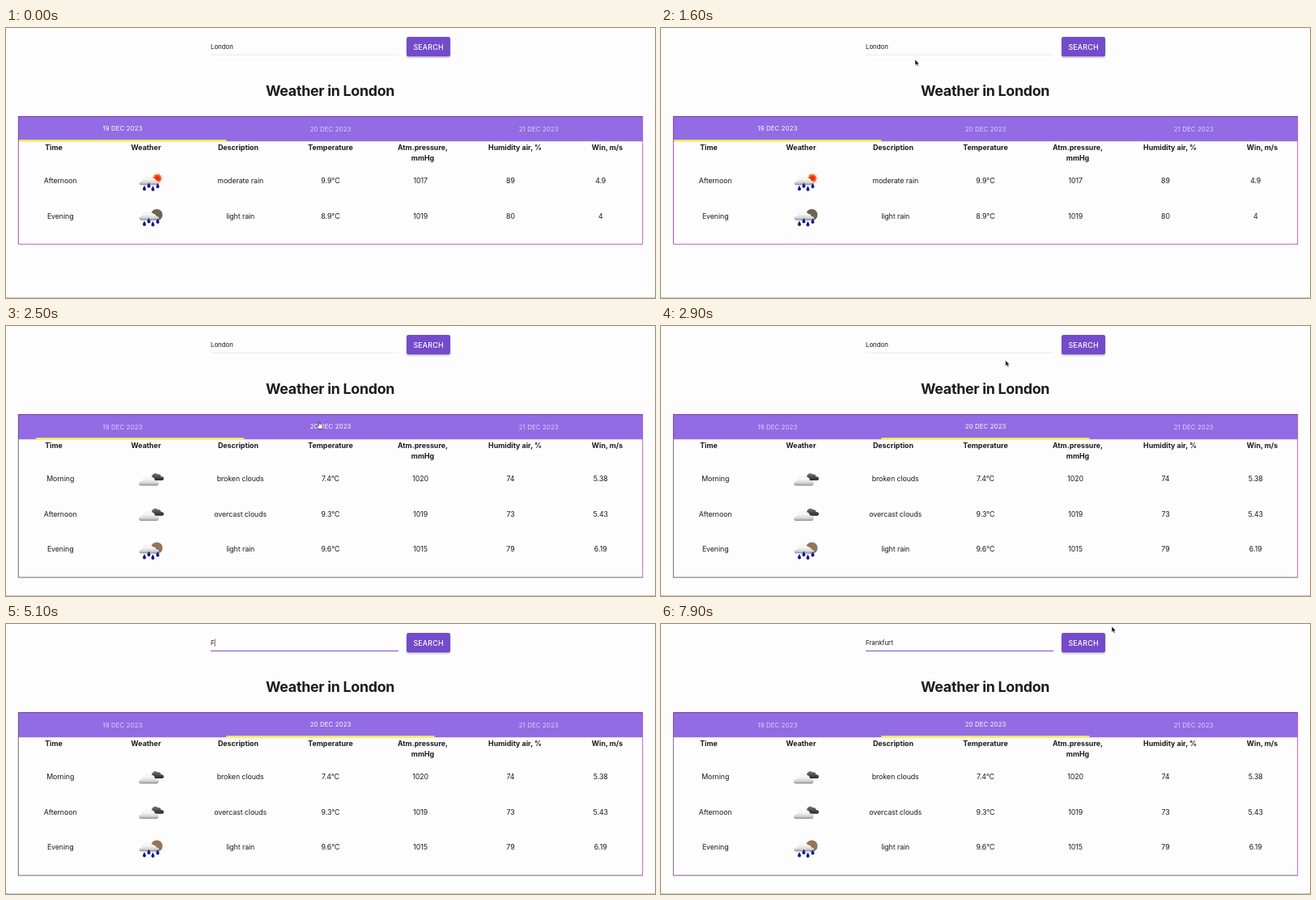
An HTML page for the animation above (8000 ms loop, 802 by 334 pixels).

```html
<!DOCTYPE html>
<html lang="en">
<head>
<meta charset="utf-8">
<title>Weather</title>
<style>
  html, body { margin: 0; width: 100%; height: 100%; overflow: hidden; background: #fdfdfd; }
  svg { display: block; width: 100%; height: 100%; }
  text { font: 400 8.8px Inter, Roboto, sans-serif; letter-spacing: -.07px; fill: #1b1b20; }
  .mid { text-anchor: middle; }
  .head { font-size: 8.9px; font-weight: 700; letter-spacing: 0; }
  .title { font-size: 17.8px; font-weight: 700; letter-spacing: -.27px; }
  .tab { font-size: 7.8px; letter-spacing: .14px; fill: #fff; }
  .btn { font-size: 8.8px; font-weight: 500; letter-spacing: .25px; fill: #fff; }
  .input { font-size: 7.8px; letter-spacing: 0; }
</style>
</head>
<body>
<svg id="stage" viewBox="0 0 802 334">
  <defs>
    <linearGradient id="pale" x2="0" y2="1">
      <stop offset=".35" stop-color="#f6f6f6"/><stop offset=".75" stop-color="#d2d2d2"/><stop offset="1" stop-color="#8c8c8c"/>
    </linearGradient>
    <linearGradient id="dark" x2="0" y2="1">
      <stop offset="0" stop-color="#777"/><stop offset=".6" stop-color="#454545"/><stop offset="1" stop-color="#2c2c2c"/>
    </linearGradient>
    <radialGradient id="sunFill">
      <stop offset=".3" stop-color="#f02a12"/><stop offset="1" stop-color="#fb9a3a"/>
    </radialGradient>
    <filter id="shade" x="-20%" y="-20%" width="140%" height="160%">
      <feDropShadow dx="0" dy="1.2" stdDeviation="1.2" flood-color="#000" flood-opacity=".28"/>
    </filter>
    <path id="cloud" d="M-12 8.5C-16 8.5-16 3-11 3C-11-3-4-6-1-2C2-3 5-1 5 2C11 1 11 8.5 7 8.5Z"/>
    <path id="drop" d="M0-3.2C.8-1.4 2 0 2 1.3A2 2 0 0 1-2 1.3C-2 0-.8-1.4 0-3.2Z" fill="#14198f"/>
  </defs>
  <rect width="802" height="334" fill="#fdfdfd"/>
  <path d="M0 333.5H802" stroke="#c9c9cb"/>

  <path d="M253 33.2H485" stroke="#dcdcde" stroke-width=".6"/>
  <path id="focus" stroke="#7048cf" stroke-width="1.1"/>
  <rect id="select" x="252.6" y="18.3" width="28.4" height="9.6" fill="#e2b9cf"/>
  <text id="city" class="input" x="253" y="26"></text>
  <path id="caret" stroke="#222" stroke-width=".7"/>
  <rect x="495" y="11" width="54" height="24.3" rx="2.4" fill="#734bcb" filter="url(#shade)"/>
  <text class="btn mid" x="522.1" y="26.5">SEARCH</text>
  <text class="title mid" x="400.6" y="84">Weather in London</text>

  <rect x="15" y="109.5" width="772" height="30.7" fill="#926be5"/>
  <g id="tabs"></g>
  <rect id="bar" y="138.2" width="257.3" height="2.1" fill="#fdf233"/>
  <g id="heads"></g>
  <g id="day0"></g>
  <g id="day1"></g>
  <path d="M15 109.5H787" stroke="#74309f" stroke-width=".9"/>
  <path id="left" stroke-width=".9"/>
  <path id="right" stroke="#b555bf" stroke-width=".9"/>
  <path id="base" stroke-width=".9"/>

  <g id="pointer">
    <path id="arrow" d="M0 0V7.2L1.7 5.7L2.9 8.3L4.1 7.7L3 5.2H5.2Z" fill="#111" stroke="#fff" stroke-width=".5"/>
    <path id="hand" d="M-.8 .5Q0-.6 .8 .5V3Q1.7 2.5 2.2 3.3Q3.2 3 3.5 3.8Q4.7 3.7 4.6 5L4 9H-.8L-3 5.7Q-2.6 4.3-.8 5.6Z" fill="#fff" stroke="#222" stroke-width=".7"/>
    <path id="beam" d="M-1.8-4Q0-4 0-3Q0-4 1.8-4M0-3V3M-1.8 4Q0 4 0 3Q0 4 1.8 4M-1 1.2H1" fill="none" stroke="#333" stroke-width=".75"/>
  </g>
</svg>
<script>
const $ = id => document.getElementById(id);
const set = (id, name, value) => $(id).setAttribute(name, value);
const show = (id, on) => set(id, "visibility", on ? "inherit" : "hidden");
const clamp = v => Math.max(0, Math.min(1, v));
const label = (s, x, y, cls = "") => `<text class="mid ${cls}" x="${x}" y="${y}">${s}</text>`;
const cloud = (x, y, k, fill) =>
  `<use href="#cloud" transform="translate(${x} ${y}) scale(${k})" fill="url(#${fill})"/>`;

function sun() {
  let d = "";
  for (let i = 0; i < 22; i++) {
    const r = i % 2 ? 4.3 : 6.8, a = i * Math.PI / 11;
    d += `${(8 + r * Math.cos(a)).toFixed(1)},${(-3 + r * Math.sin(a)).toFixed(1)} `;
  }
  return `<polygon points="${d}" fill="url(#sunFill)"/>`;
}

const moon = fill => `<circle cx="7.3" cy="-1.5" r="7.2" fill="${fill}"/>`;
const drops = [[-8, 9], [-2.5, 5.5], [2.5, 9.5], [8.5, 6]]
  .map(([x, y]) => `<use href="#drop" x="${x}" y="${y}"/>`).join("");
const rain = behind => behind + cloud(3, -1, .72, "pale") + cloud(-1, -2.5, .9, "pale") + drops;
const icons = {
  day: rain(sun()),
  night: rain(moon("#6d6453")),
  dusk: rain(moon("#957457")),
  clouds: cloud(9, -4, .72, "dark") + cloud(0, 0, 1, "pale")
};

const days = [
  [["Afternoon", "day", "moderate rain", "9.9°C", 1017, 89, 4.9],
   ["Evening", "night", "light rain", "8.9°C", 1019, 80, 4]],
  [["Morning", "clouds", "broken clouds", "7.4°C", 1020, 74, 5.38],
   ["Afternoon", "clouds", "overcast clouds", "9.3°C", 1019, 73, 5.43],
   ["Evening", "dusk", "light rain", "9.6°C", 1015, 79, 6.19]]
];

days.forEach((rows, d) => {
  $("day" + d).innerHTML = rows.map((row, r) => {
    const y = 189 + r * 43.6;
    return row.map((cell, c) => c === 1
      ? `<g transform="translate(179 ${y})">${icons[cell]}</g>`
      : label(cell, 67.2 + c * 111.25, y + 3.2)).join("");
  }).join("");
});

$("heads").innerHTML =
  ["Time", "Weather", "Description", "Temperature", "Atm.pressure,", "Humidity air, %", "Win, m/s"]
    .map((s, i) => label(s, 59 + i * 114, 150.5, "head")).join("") + label("mmHg", 515, 164.3, "head");
$("tabs").innerHTML = [19, 20, 21].map((n, i) => label(n + " DEC 2023", 144 + i * 257.1, 128, "tab")).join("");

// time, x, y of the pointer's hot spot
const route = [
  [600, 460, 40], [700, 390, 28], [800, 348, 22], [900, 348, 22], [1200, 300, 22], [1500, 300, 22],
  [1600, 314, 39], [1900, 344, 74], [2400, 387, 118.5], [2500, 387, 118.5], [2900, 425.7, 42.5],
  [3200, 381, 20], [3800, 377, 21], [7700, 380, 20], [7800, 495, 9], [7900, 557, 3]
];
const keys = [5100, 5400, 5600, 5900, 6300, 6700, 6900, 7100, 7300];

function pointAt(t) {
  const i = route.findIndex(p => p[0] > t);
  if (i < 0) return route[route.length - 1].slice(1);
  if (i === 0) return route[0].slice(1);
  const a = route[i - 1], b = route[i], k = (t - a[0]) / (b[0] - a[0]);
  return [a[1] + (b[1] - a[1]) * k, a[2] + (b[2] - a[2]) * k];
}

// cubic-bezier(.4, 0, .2, 1)
function ease(x) {
  let lo = 0, hi = 1;
  for (let i = 0; i < 20; i++) {
    const s = (lo + hi) / 2, q = 1 - s;
    if (1.2 * q * q * s + .6 * q * s * s + s ** 3 < x) lo = s; else hi = s;
  }
  return lo * lo * (3 - 2 * lo);
}

function drawPointer(t) {
  const [x, y] = pointAt(t);
  const inInput = x > 253 && x < 486 && y > 10 && y < 33;
  const onButton = x > 495 && x < 549 && y > 11 && y < 35;
  const onTab = y > 109 && y < 140;
  show("pointer", (t >= 600 && t < 5100) || t >= 7700);
  set("pointer", "transform", `translate(${x} ${y})`);
  show("beam", inInput);
  show("hand", onButton || onTab);
  show("arrow", !inInput && !onButton && !onTab);
}

function drawInput(t) {
  const typed = keys.filter(k => k <= t).length;
  $("city").textContent = typed ? "Frankfurt".slice(0, typed) : "London";
  const half = 116 * ease(clamp((t - 3300) / 300));
  set("focus", "d", `M${369 - half} 33.2H${369 + half}`);
  show("focus", t >= 3400);
  show("select", t >= 3600 && t < 5100);
  show("caret", typed && t < 7700);
  if (typed) set("caret", "d", `M${253.5 + $("city").getComputedTextLength()} 18.6V27.6`);
}

function drawPanel(t) {
  const day = t < 2500 ? 0 : 1, bottom = day ? 311 : 267.4;
  show("day0", !day);
  show("day1", day);
  [...$("tabs").children].forEach((tab, i) => {
    tab.setAttribute("fill-opacity", i === day ? 1 : .7);
    tab.setAttribute("y", i === day ? 127 : 128);
  });
  set("bar", "x", 15 + 257.2 * ease(clamp((t - 2450) / 300)));
  set("left", "d", `M15.3 109.5V${bottom}`);
  set("right", "d", `M786.7 109.5V${bottom}`);
  set("base", "d", `M15 ${bottom}H787`);
  set("left", "stroke", day ? "#66566b" : "#8b3d93");
  set("base", "stroke", day ? "#66566b" : "#b555bf");
}

function draw(now) {
  const t = Math.floor(now % 8000 / 100) * 100;
  drawPanel(t);
  drawInput(t);
  drawPointer(t);
  requestAnimationFrame(draw);
}
draw(0);
</script>
</body>
</html>
```
